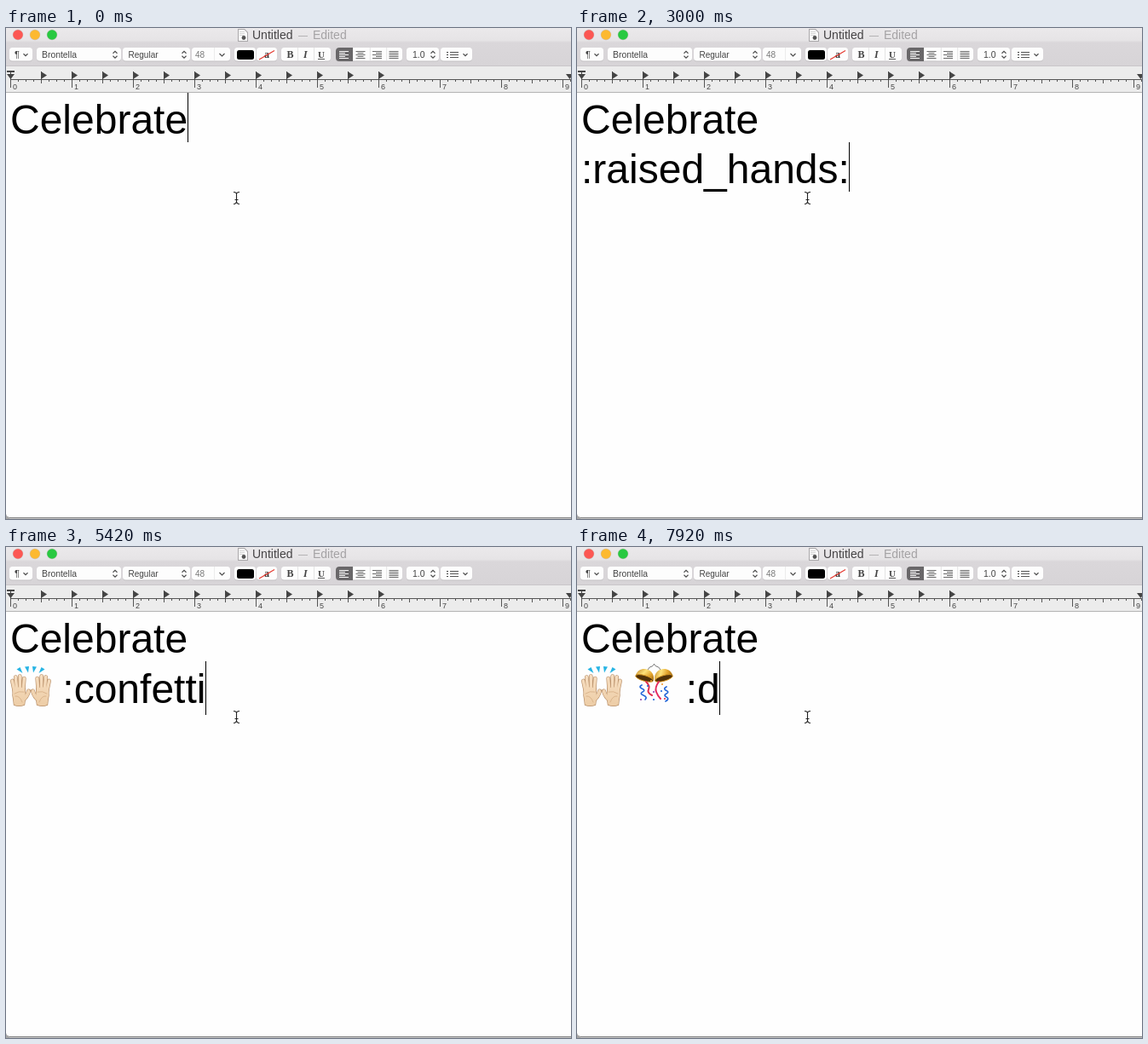
These frames come from a looping animation (663x576 px, 8000 ms). An HTML page with a canvas:

```html
<!DOCTYPE html>
<html lang="en">
<head>
<meta charset="utf-8">
<title>Untitled</title>
<style>
html, body { margin: 0; width: 100%; height: 100%; overflow: hidden; background: #fefefe; }
canvas { display: block; }
</style>
</head>
<body>
<canvas id="stage" width="663" height="576"></canvas>
<script>
const c = document.getElementById('stage').getContext('2d');
const LOOP = 8000;
const SANS = '"Liberation Sans", Arial, sans-serif';
const SERIF = '"Liberation Serif", Times, serif';
const BIG = '48px ' + SANS;
const LEFT = 5;

// ---- drawing helpers ----
function rect(x, y, w, h, color) {
  c.fillStyle = color;
  c.fillRect(x, y, w, h);
}
function box(x, y, w, h, r, color) {
  c.fillStyle = color;
  c.beginPath();
  c.roundRect(x, y, w, h, r);
  c.fill();
}
function dot(x, y, r, color) {
  c.fillStyle = color;
  c.beginPath();
  c.arc(x, y, r, 0, 7);
  c.fill();
}
function text(s, x, y, font, color) {
  c.font = font;
  c.fillStyle = color;
  c.fillText(s, x, y);
}
function poly(points, color) {
  c.fillStyle = color;
  c.beginPath();
  points.forEach(([x, y]) => c.lineTo(x, y));
  c.closePath();
  c.fill();
}
function line(points, color, width = 1) {
  c.strokeStyle = color;
  c.lineWidth = width;
  c.beginPath();
  points.forEach(([x, y]) => c.lineTo(x, y));
  c.stroke();
}
function curve(path, color, width) {
  c.strokeStyle = color;
  c.lineWidth = width;
  c.stroke(new Path2D(path));
}

// ---- window chrome ----
function chevron(x, y, dir, size = 2.5) {
  line([[x - size, y - dir * size / 2], [x, y + dir * size / 2], [x + size, y - dir * size / 2]], '#4a4a4a', 1.1);
}
function stepper(x) {
  chevron(x, 28.5, -1);
  chevron(x, 34, 1);
}
function button(x, end) {
  box(x, 24, end - x, 15.5, 3.5, '#c3c0c3');
  box(x, 23, end - x, 15.5, 3.5, '#fdfdfd');
}

function titleBar() {
  const g = c.createLinearGradient(0, 0, 0, 45);
  g.addColorStop(0, '#ebe9eb');
  g.addColorStop(0.32, '#e6e4e6');
  g.addColorStop(0.38, '#dad7da');
  g.addColorStop(1, '#d7d4d7');
  rect(0, 0, 663, 45, g);
  ['#fc5753', '#fdb92f', '#29c941'].forEach((color, i) => {
    dot(14 + 20 * i, 8, 6.2, 'rgba(90,60,40,.2)');
    dot(14 + 20 * i, 8, 5.8, color);
  });

  poly([[272, 1], [280, 1], [284, 5], [284, 16], [272, 16]], '#a9a7a9');
  poly([[273, 2], [279.5, 2], [283, 5.5], [283, 15], [273, 15]], '#fafafa');
  for (let y = 4; y < 10; y += 2) rect(274, y, 6, 0.7, '#c9c9c9');
  dot(279, 11.5, 2.4, '#555');

  text('Untitled', 289, 13, '14px ' + SANS, '#454345');
  text('—', 343, 12, '11px ' + SANS, '#a4a2a4');
  text('Edited', 360, 13, '14px ' + SANS, '#a4a2a4');
}

function alignIcon(x, kind, color) {
  for (let i = 0; i < 5; i++) {
    const w = kind === 'full' || i % 2 === 0 ? 11 : 7;
    const shift = kind === 'right' ? 11 - w : kind === 'center' ? (11 - w) / 2 : 0;
    rect(x + shift, 27 + i * 2, w, 1, color);
  }
}

function toolBar() {
  const small = '10px ' + SANS;
  [[4, 31], [36, 135], [137, 216], [218, 263], [268, 293], [294, 318],
   [323, 381], [387, 465], [470, 508], [510, 547]].forEach(([x, end]) => button(x, end));

  text('¶', 10, 35, '11px ' + SANS, '#444');
  chevron(23, 31.5, 1);
  text('Brontella', 42, 35, '10.4px ' + SANS, '#444');
  stepper(128);
  text('Regular', 143.5, 35, small, '#444');
  stepper(209);
  text('48', 222, 34.5, small, '#777');
  rect(244, 23, 1, 15, '#ececec');
  chevron(253.5, 31.5, 1, 3);

  box(271, 26, 20, 11, 2.5, '#000');
  text('a', 303, 35, 'bold 12px ' + SERIF, '#333');
  line([[297, 37], [315, 26.5]], '#e5392f', 1.2);

  rect(342, 23, 1, 15, '#e4e4e4');
  rect(361, 23, 1, 15, '#e4e4e4');
  text('B', 329.5, 35, 'bold 12px ' + SERIF, '#444');
  text('I', 349, 35, 'italic bold 12px ' + SERIF, '#444');
  text('U', 366, 34.5, 'bold 11px ' + SERIF, '#444');
  rect(366, 36, 8, 1, '#555');

  box(387, 23, 20, 16, [4, 0, 0, 4], '#696769');
  ['left', 'center', 'right', 'full'].forEach((kind, i) => {
    if (i > 1) rect(388 + i * 19.4, 23, 1, 15, '#e4e4e4');
    alignIcon(391 + i * 19.5, kind, i ? '#696969' : '#fff');
  });

  text('1.0', 477, 35, '10.5px ' + SANS, '#444');
  stepper(501);
  for (let y = 28; y < 36; y += 3) {
    rect(517, y, 2, 1, '#444');
    rect(521, y, 10, 1, '#555');
  }
  chevron(539, 31.5, 1);
}

function ruler() {
  rect(0, 45, 663, 30, '#ececec');
  rect(0, 44, 663, 1, '#c9c6c9');
  rect(0, 75, 663, 1, '#b4b4b4');
  rect(5, 60, 658, 1, '#555');
  for (let i = 0; LEFT + i * 9 < 663; i++) {
    const h = i % 8 === 0 ? 10 : i % 4 === 0 ? 5 : 3;
    rect(LEFT + i * 9, 60, 1, h, '#555');
    if (i % 8 === 0) text(i / 8, LEFT + i * 9 + 3, 72, '9px ' + SANS, '#444');
  }
  for (let x = 41; x < 440; x += 36) {
    poly([[x, 51], [x + 7, 55.5], [x, 60]], '#444');
    rect(x, 51, 1, 10, '#444');
  }
  rect(1, 50, 9, 2, '#444');
  rect(5, 51, 1, 10, '#444');
  poly([[1, 54], [10, 54], [5.5, 60]], '#444');
  poly([[657, 54], [666, 54], [661.5, 60]], '#444');
}

function bottomEdge() {
  rect(0, 574, 663, 2, '#c4c4c4');
  rect(0, 574, 663, 1, '#858585');
  poly([[0, 570], [1, 572.5], [4, 574], [4, 576], [0, 576]], '#a5a5a5');
}

function pointer() {
  curve('M267 192.5 Q270.5 192.5 270.5 195 V203 Q270.5 206.5 267 206.5 M274 192.5 Q270.5 192.5 270.5 195 M274 206.5 Q270.5 206.5 270.5 203 M268.5 201.5 H272.5', '#222', 1.1);
}

// ---- emoji ----
function hand() {
  const fingers = 'M10.5 172 L7.4 157 M13 170 L11.3 152.5 M16.5 170 L16.3 151.5 M20 171 L21.3 154';
  const thumb = 'M19 180 Q25 176 26.5 169';
  const palm = new Path2D('M8.5 166 Q15 163 22 166 L23 176 Q22 180 21.5 185 Q15 187.5 9.5 185 Q9 179 8 174 Z');
  c.lineCap = 'round';
  curve(fingers, '#b88e67', 4.7);
  curve(thumb, '#b88e67', 5);
  c.strokeStyle = '#b88e67';
  c.lineWidth = 1.4;
  c.stroke(palm);
  const skin = c.createLinearGradient(0, 150, 0, 186);
  skin.addColorStop(0, '#f7dfc2');
  skin.addColorStop(1, '#edcda6');
  curve(fingers, skin, 3.4);
  curve(thumb, skin, 3.7);
  c.fillStyle = skin;
  c.fill(palm);
  curve('M10 172 Q15 168.5 21 170 M11 175 Q16 174 19 182', '#d5ac83', 0.8);
  c.lineCap = 'butt';
  poly([[12.5, 143.5], [16.5, 141], [19.5, 148]], '#27b4e4');
  poly([[22, 140.5], [27, 140], [26, 147.5]], '#27b4e4');
}

function raisedHands() {
  hand();
  c.save();
  c.translate(58, 0);
  c.scale(-1, 1);
  hand();
  c.restore();
}

function bowl(x, angle) {
  c.save();
  c.translate(x, 152.5);
  c.rotate(angle);
  const gold = c.createLinearGradient(-11, -10, 11, 3);
  gold.addColorStop(0, '#b9791a');
  gold.addColorStop(0.4, '#ffe27a');
  gold.addColorStop(0.7, '#e0a02a');
  gold.addColorStop(1, '#93600f');
  c.fillStyle = gold;
  c.fill(new Path2D('M-11 1 C-10 -13 10 -13 11 1 Q0 8 -11 1 Z'));
  c.beginPath();
  c.ellipse(0, 1.5, 10.8, 3.3, 0, 0, 7);
  c.fillStyle = '#513108';
  c.fill();
  c.strokeStyle = '#d99a28';
  c.lineWidth = 0.9;
  c.stroke();
  c.restore();
}

function confettiBall() {
  curve('M83 144 Q85 140 88 140 Q90 139 90.5 137 Q91 139 93 140 Q96 140 98 144', '#777', 1);
  bowl(79.5, 0.28);
  bowl(101.5, -0.28);
  c.lineCap = 'round';
  curve('M76 162 q-4 2 0 4 q5 2 1 4 q-4 2 1 4 q5 2 2 5', '#2467d8', 1.7);
  curve('M105 164 q-4 2 -1 4 q5 2 1 4 q-4 2 0 4 q4 2 -1 5', '#2467d8', 1.7);
  curve('M81 158 Q86 163 84 167 T88 174', '#e0304f', 2);
  curve('M96 158 Q91 165 93 170 T98 178', '#e42b60', 2);
  c.lineCap = 'butt';
  [[83, 163, '#2467d8'], [90, 179, '#2467d8'], [100, 161, '#f09a30'], [87, 157, '#f09a30'],
   [75, 179, '#8b45b0'], [103, 178, '#e0304f'], [90, 170, '#8b45b0'], [99, 169, '#2467d8']]
    .forEach(([x, y, color]) => dot(x, y, 1.1, color));
}

// ---- typing script ----
const steps = [];
let last = { icons: 0, typed: '', row: 0, caret: true };
function at(time, change) {
  last = { ...last, caret: true, ...change, time };
  steps.push(last);
}
function type(chars, start, end = start) {
  const gap = chars.length > 1 ? (end - start) / (chars.length - 1) : 0;
  [...chars].forEach((ch, i) => at(start + gap * i, { typed: last.typed + ch }));
}
const hideCaret = time => at(time, { caret: false });

at(0, {});
at(360, { row: 1 });
hideCaret(920);
type(':', 1040);
type('raise', 1340, 1750);
type('d', 1930);
type('_', 2110);
type('hand', 2350, 2640);
type('s', 2790);
type(':', 3000);
at(3410, { icons: 1, typed: '' });
hideCaret(3950);
type(':', 4180);
type('c', 4600);
type('onfe', 4720, 4950);
type('tti', 5190, 5420);
type('_', 5780);
type('bal', 5960, 6140);
type('l', 6320);
type(':', 6550);
at(6970, { icons: 2, typed: '' });
hideCaret(7500);
type(':', 7560);
type('d', 7920);

function documentText(state) {
  const { icons, typed, row, caret } = state;
  text('Celebrate', LEFT, 123.5, BIG, '#000');
  const x = LEFT + icons * (48 + 13.34);
  text(typed, x, icons ? 183 : 181.5, BIG, '#000');
  if (icons > 0) raisedHands();
  if (icons > 1) confettiBall();
  if (!caret) return;
  c.font = BIG;
  const end = row ? x + c.measureText(typed).width : LEFT + c.measureText('Celebrate').width;
  rect(Math.floor(end), row ? 134 : 76, 1, icons ? 63 : 58, '#000');
}

function draw(now) {
  const t = now % LOOP;
  rect(0, 0, 663, 576, '#fefefe');
  titleBar();
  toolBar();
  ruler();
  bottomEdge();
  documentText(steps.findLast(s => s.time <= t));
  pointer();
}

const begin = performance.now();
function frame() {
  draw(performance.now() - begin);
  requestAnimationFrame(frame);
}
frame();
</script>
</body>
</html>
```
